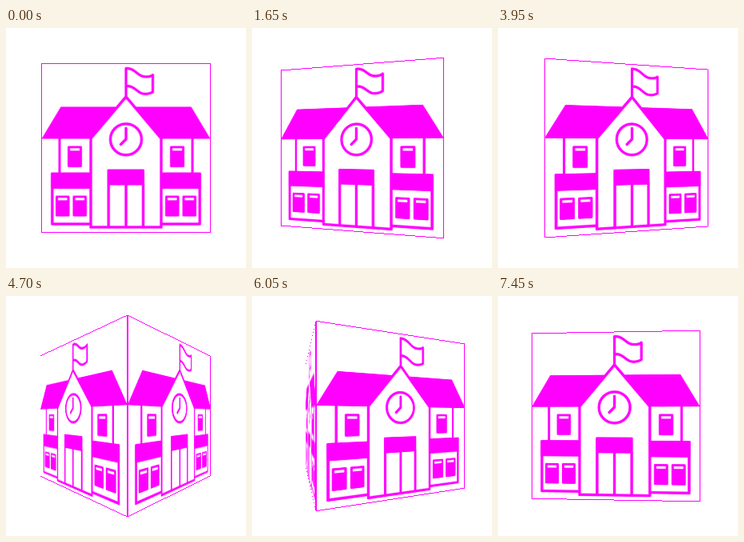
These frames come from a looping animation (300 px wide and 300 px high, 7500 ms). An HTML page with a canvas:

```html
<!DOCTYPE html>
<html lang="en">
<head>
<meta charset="utf-8">
<title>Rotating school cube</title>
<style>
  html, body { margin: 0; width: 100%; height: 100%; overflow: hidden; background: #fff; }
  canvas { display: block; width: 300px; height: 300px; }
</style>
</head>
<body>
<canvas id="stage" width="300" height="300"></canvas>
<script>
const LOOP = 7500, STEP = 50;
const HALF = 75.3, EYE = 262.8, MID = 150;
const FRONT = HALF * EYE / (EYE - HALF);  // half size of a face seen head-on
const LINE = HALF / FRONT;                // border width in face units
const TEX = 422;
const INK = '#f0f';

const stage = document.getElementById('stage').getContext('2d');
const face = drawFace();

// The school, in head-on stage coordinates
function drawFace() {
  const canvas = document.createElement('canvas');
  canvas.width = canvas.height = TEX;
  const g = canvas.getContext('2d');
  const zoom = TEX / (2 * FRONT);
  g.scale(zoom, zoom);
  g.translate(FRONT - MID, FRONT - MID);
  g.fillStyle = '#fff';
  g.fillRect(0, 0, 300, 300);
  g.strokeStyle = INK;
  g.lineJoin = g.lineCap = 'round';

  const stroke = (d, width = 3.4) => {
    g.lineWidth = width;
    g.stroke(new Path2D(d));
  };
  const block = (x, y, w, h, color = INK, r = 1.5) => {
    g.fillStyle = color;
    g.beginPath();
    g.roundRect(x, y, w, h, r);
    g.fill();
  };
  const pane = (x, y, w, h) => {
    block(x, y, w, h);
    block(x + 3, y + 2.8, w - 6, 3, '#fff', 0);
  };

  // Roofs
  g.fillStyle = INK;
  g.fill(new Path2D('M68.5 98.5 H139 L106 138.5 H44.5 Z'));
  g.fill(new Path2D('M231.5 98.5 H161 L194 138.5 H255.5 Z'));

  // Wings
  stroke('M67 138 V182 M233 138 V182', 3);
  block(56, 180.5, 50, 20.5);
  block(194, 180.5, 50, 20.5);
  stroke('M57.8 200 V245 H106 M242.2 200 V245 H194');
  for (const x of [77, 205]) pane(x, 147.5, 18, 26.5);
  for (const x of [62, 83.5, 199, 220.5]) pane(x, 209.5, 17.5, 26);

  // Gable, flag and clock
  g.fillStyle = '#fff';
  g.fill(new Path2D('M106 249 V138 L150 86 L194 138 V249 Z'));
  stroke('M106 249 V138 L150 86 L194 138 V249 Z');
  stroke('M150 86 V50.5 C162 50 164 61 175 61 C179 61 182 60 183.5 58.7 V80 C180 82 177 82.5 174 82.5 C164 82.5 162 72 150 72.5', 3.2);
  g.beginPath();
  g.arc(150, 139.3, 19.5, 0, 2 * Math.PI);
  stroke('M169.5 139.3 A19.5 19.5 0 1 1 130.5 139.3 A19.5 19.5 0 1 1 169.5 139.3');
  stroke('M150 125.5 V139 L143.5 145.5');

  // Door
  block(126.5, 176.5, 46.5, 20);
  stroke('M128.2 195 V249 M150 195 V249 M171.5 195 V249');
  return canvas;
}

// One face, painted column by column in perspective
function paintFace(angle) {
  const c = Math.cos(angle), n = Math.sin(angle);
  if (EYE * c <= HALF) return;
  const zoomAt = u => EYE / (EYE + u * n - HALF * c);
  const toScreen = u => MID + (u * c + HALF * n) * zoomAt(u);
  const toFace = x => {
    const s = x - MID;
    return (EYE * HALF * n - s * (EYE - HALF * c)) / (s * n - EYE * c);
  };
  const clamp = u => Math.max(-HALF, Math.min(HALF, u));
  const unit = TEX / (2 * HALF);
  const first = Math.ceil(toScreen(-HALF) - 0.5);
  const last = Math.ceil(toScreen(HALF) - 0.5) - 1;

  for (let x = first; x <= last; x++) {
    const u = toFace(x + 0.5);
    const a = clamp(toFace(x)), b = clamp(toFace(x + 1));
    const reach = HALF * zoomAt(u);
    stage.drawImage(face, (a + HALF) * unit, 0, (b - a) * unit, TEX, x, MID - reach, 1, 2 * reach);

    const top = Math.ceil(MID - reach - 0.5);
    const height = 2 * (MID - top);
    stage.fillStyle = INK;
    if (u + HALF < LINE || x === last) {
      stage.fillRect(x, top, 1, height);
    } else {
      stage.fillRect(x, top, 1, 1);
      stage.fillRect(x, top + height - 1, 1, 1);
    }
  }
}

function render(ms) {
  const time = Math.floor((ms % LOOP) / STEP) * STEP;
  const turn = 2 * Math.PI * time / LOOP;
  stage.imageSmoothingQuality = 'high';
  stage.fillStyle = '#fff';
  stage.fillRect(0, 0, 300, 300);
  for (let i = 0; i < 4; i++) paintFace(turn + i * Math.PI / 2);
}

const start = performance.now();
function tick() {
  render(performance.now() - start);
  requestAnimationFrame(tick);
}
tick();
</script>
</body>
</html>
```
